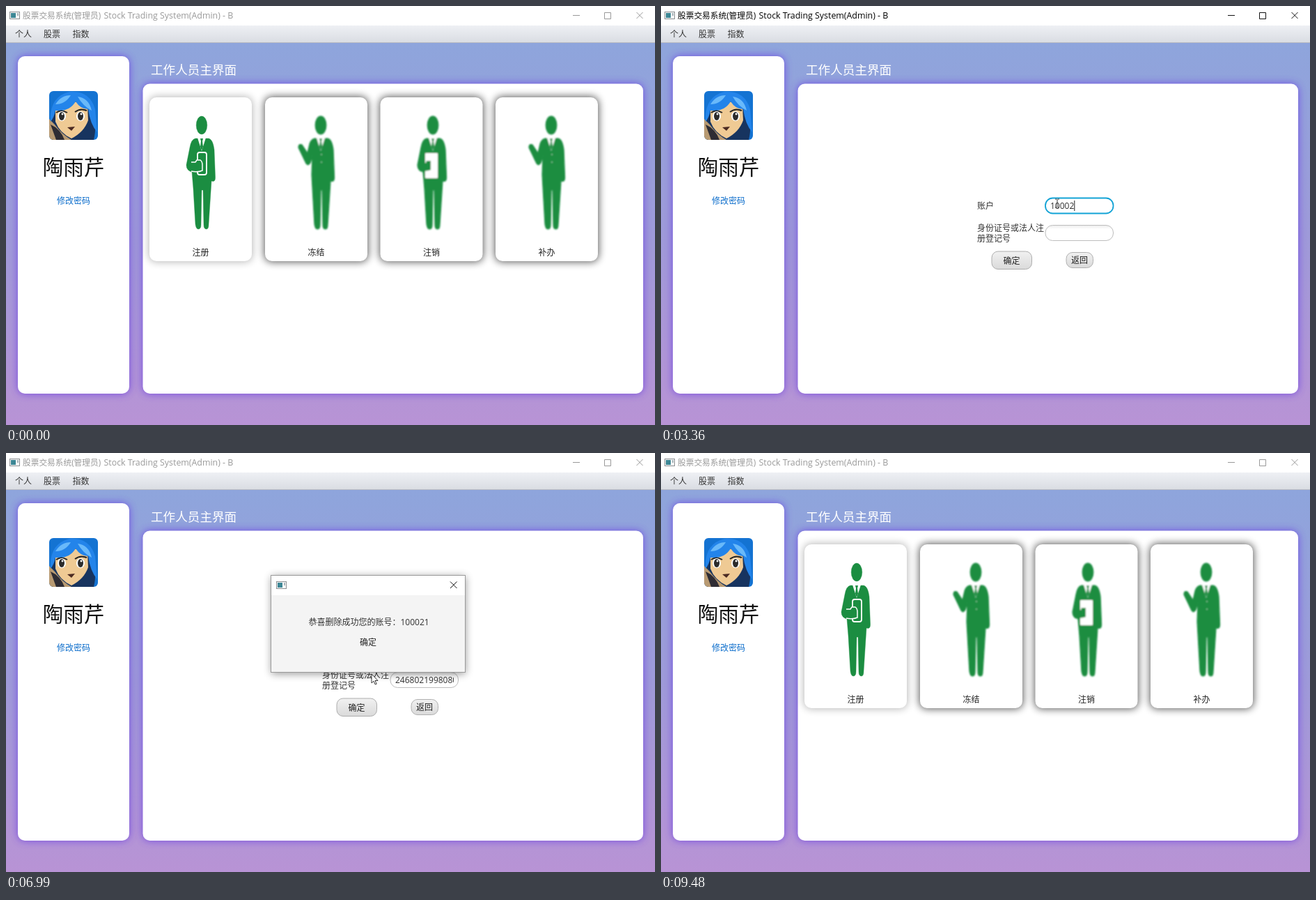
Write an HTML page that moves like this. It is 932 by 601 pixels and loops after 9570 ms.

```html
<!DOCTYPE html>
<html lang="zh-CN">
<head>
<meta charset="utf-8">
<title>股票交易系统</title>
<style>
html, body { margin: 0; width: 100%; height: 100%; overflow: hidden; background: #fff; }
svg { display: block; width: 932px; height: 601px; }
text { font: 12px "Open Sans", "Noto Sans CJK SC", "Noto Sans CJK JP", "Noto Sans CJK", sans-serif; white-space: pre; }
</style>
</head>
<body>
<svg id="stage" viewBox="0 0 932 601" xmlns="http://www.w3.org/2000/svg"></svg>
<script>
const LOOP = 9570;
const GREEN = '#1b8d41';

// Markup helpers
const rect = (x, y, w, h, r, attrs) => `<rect x="${x}" y="${y}" width="${w}" height="${h}" rx="${r}" ${attrs}/>`;
const label = (x, y, str, attrs = 'fill="#333"') => `<text x="${x}" y="${y}" ${attrs}>${str}</text>`;
const path = (d, attrs) => `<path d="${d}" ${attrs}/>`;
const gradient = (id, ...colors) => `<linearGradient id="${id}" x2="0" y2="1">${colors.map((c, i) =>
  `<stop offset="${i / (colors.length - 1)}" stop-color="${c}"/>`).join('')}</linearGradient>`;
const blur = (id, s) => `<filter id="${id}" x="-30%" y="-30%" width="160%" height="160%"><feGaussianBlur stdDeviation="${s}"/></filter>`;

const defs = `<defs>
  ${gradient('sky', '#8ea5dc', '#9e9ad9', '#b893d5')}
  ${gradient('bar', '#eef0f4', '#dadde3')}
  ${gradient('btn', '#f1f1f1', '#dadada')}
  ${gradient('inset', '#ececec', '#fff', '#fff', '#fff', '#fff')}
  ${blur('glow', 6)}${blur('shade', 6)}${blur('soft', .9)}
  <clipPath id="face"><rect x="62" y="122" width="70" height="70" rx="6"/></clipPath>
  <clipPath id="entry"><rect x="557" y="314" width="86" height="24"/></clipPath>
</defs>`;

const appIcon = (x, y) => `<g transform="translate(${x} ${y})">
  ${rect(.5, .5, 14, 10, 0, 'fill="#f7f7f7" stroke="#8b8f92"')}
  ${rect(2, 2, 7, 7, 0, 'fill="#3d8795"')}${rect(11, 2, 2, 4, 0, 'fill="#a9b5ba"')}</g>`;

const panel = (x, y, w, h) =>
  rect(x, y, w, h, 10, 'fill="#6a3ce2" opacity=".85" filter="url(#glow)"') + rect(x, y, w, h, 10, 'fill="#fff"');

const avatar = `<g clip-path="url(#face)">
  ${rect(62, 122, 70, 70, 0, 'fill="#1473d2"')}
  ${path('M66 192C60 160 68 130 95 124C122 126 134 158 126 192Z', 'fill="#17345f"')}
  ${path('M71 146Q90 130 117 143L118 164Q112 181 94 190Q77 182 71 166Z', 'fill="#efca94"')}
  ${path('M62 162L70 170Q80 184 94 192H62Z', 'fill="#b89a72"')}
  ${path('M64 170Q78 176 84 192H72Z', 'fill="#2e2c33"')}
  ${path('M64 166Q62 130 91 123Q120 121 128 148L131 181Q121 170 118 148Q107 148 100 137Q91 152 71 150Q69 160 64 166Z', 'fill="#2384ea"')}
  ${path('M71 141Q79 128 93 128Q85 141 71 141ZM103 130Q119 132 123 150Q110 143 103 130Z', 'fill="#69b9fa"')}
  ${path('M72 153Q79 148 88 153M99 152Q107 146 116 150', 'fill="none" stroke="#222" stroke-width="2"')}
  ${[80, 107].map(x => `<ellipse cx="${x}" cy="158" rx="6" ry="7" fill="#fff"/><ellipse cx="${x}" cy="158" rx="4" ry="6" fill="#2b2b2b"/><circle cx="${x + 1}" cy="155" r="1.4" fill="#fff"/>`).join('')}
  ${path('M88 174L99 173L94 179Z', 'fill="#4b2a22"')}
</g>`;

// Figures are drawn around the centre line of the head
const legs = 'L-9 313Q-8 320 -5 320Q-1 320 -1 314L0 264H2L3 314Q3 320 7 320Q10 320 10 313L14 251Q20 253 19.500 245L18 206Q16 191 10 190Z';
const folded = 'M-9 190Q-15 191 -17 203L-22 228Q-22 236 -14 238L-12 262' + legs;
const waving = 'M-9 190Q-14 191 -16 198L-19 211L-27 199Q-32 197 -32 203L-21 226Q-18 230 -15 225L-12 215L-13 242' + legs;
const collar = path('M-6 189L0 208L6 189Z', 'fill="#fff"') + path('M-2 190H2L1 194L2 202L0 207L-2 202L-1 194Z', `fill="${GREEN}"`);
const hand = 'M-20 228L-10 225L-9 222H-3V235Q-8 237 -19 237Z';
const board = rect(-6, 210, 13, 32, 3, `fill="${GREEN}" stroke="#fff" stroke-width="1.8"`) +
  path('M-15 224H-9L-7 221H-2Q1 223 1 228V236Q-6 239 -15 237', `fill="${GREEN}" stroke="#fff" stroke-width="1.5"`);
const sheet = rect(-11, 211, 18, 36, 1, 'fill="#fff"') + path(hand, `fill="${GREEN}"`);
const dots = '<circle cx="1" cy="213" r="1" fill="#8cc6a0"/><circle cx="1" cy="224" r="1" fill="#8cc6a0"/>';

const figure = (x, body, extra, soft) => `<g transform="translate(${x})" ${soft ? 'filter="url(#soft)"' : ''}>
  <g fill="${GREEN}" stroke="${GREEN}" stroke-width="${soft ? 1.2 : .4}"><ellipse cy="171" rx="7.8" ry="13"/>${path(body, '')}</g>
  ${collar}${extra}</g>`;

const cards = [
  { x: 206, name: '注册', art: figure(281, folded, board, false), shade: .28 },
  { x: 372, name: '冻结', art: figure(452, waving, dots, true), shade: .65 },
  { x: 537.5, name: '注销', art: figure(613, folded, sheet, true), shade: .65 },
  { x: 703, name: '补办', art: figure(783, waving, dots, true), shade: .65 }
];
const cardMarkup = (c, i) => rect(c.x, 131, 147, 235, 10, `id="shade${i}" filter="url(#shade)"`) +
  rect(c.x, 131, 147, 235, 10, 'fill="#fff"') + c.art +
  label(c.x + 73.5, 358, c.name, 'text-anchor="middle" fill="#222"');

const field = (id, y) => rect(552, y, 97.5, 22, 10.5, 'fill="url(#inset)" stroke="#bdbdbd"') +
  rect(552, y, 97.5, 22, 10.5, `id="${id}" fill="#fff" stroke="#12a3d6" stroke-width="1.8"`);

const form = `<g id="form">
  ${label(454, 290.5, '账户')}${label(454, 323, '身份证号或法人注')}${label(454, 337.5, '册登记号')}
  ${field('focus1', 275.5)}${field('focus2', 314.5)}
  ${label(559, 291, '', 'id="account" fill="#333"')}
  <g clip-path="url(#entry)">${label(559, 330, '246802199808080000', 'id="idNo" fill="#333"')}</g>
  ${rect(0, 0, 1, 15, 0, 'id="caret" fill="#222"')}
  ${rect(475, 352, 57.5, 25.5, 9, 'id="ok" fill="url(#btn)"')}${label(503.5, 369.5, '确定', 'text-anchor="middle" fill="#222"')}
  ${rect(582, 353.5, 38.5, 22, 9, 'fill="url(#btn)" stroke="#b0b0b0"')}${label(601, 369, '返回', 'text-anchor="middle" fill="#222"')}
</g>`;

const dialog = `<g id="dialog">
  ${rect(381, 177, 279, 140, 2, 'fill="#000" opacity=".4" filter="url(#shade)"')}
  ${rect(380.5, 175.5, 279, 139, 0, 'fill="#f4f4f4" stroke="#9a9a9a"')}
  ${rect(381, 176, 278, 28, 0, 'fill="#fff"')}${appIcon(388, 184)}
  ${path('M638 184.500L647.500 194M647.500 184.500L638 194', 'id="shut" fill="none"')}
  ${label(434.5, 247, '恭喜删除成功您的账号：100021')}
  <circle id="ripple" cx="525.5" cy="273" r="8.5" fill="#9a9a9a"/>
  ${label(520, 276, '确定', 'text-anchor="middle" fill="#222"')}
</g>`;

const chrome = rect(0, 0, 932, 28, 0, 'fill="#fff"') + appIcon(5, 8) +
  `<g id="caption">${label(24, 18, '股票交易系统(管理员)', 'style="font-size:11.7px"')}${label(140.5, 18, 'Stock Trading System(Admin) - B', 'style="font-size:12.4px"')}</g>` +
  path('M814 13.500H824M859.500 9.500H868.500V18.500H859.500ZM905.500 9L914.500 18M914.500 9L905.500 18', 'id="controls" fill="none"') +
  rect(0, 28, 932, 24, 0, 'fill="url(#bar)"') + rect(0, 52, 932, 1, 0, 'fill="#b9bbc2"') +
  label(13, 45, '个人') + label(54, 45, '股票') + label(95.5, 45, '指数');

const stage = document.getElementById('stage');
stage.innerHTML = defs + rect(0, 52, 932, 549, 0, 'fill="url(#sky)"') + chrome +
  panel(17, 72, 160, 484) + panel(196.5, 111.5, 718.5, 444.5) + avatar +
  label(97, 242, '陶雨芹', 'text-anchor="middle" fill="#111" style="font-size:29.5px"') +
  label(97, 284, '修改密码', 'text-anchor="middle" fill="#0a6ccb"') +
  label(208, 98, '工作人员主界面', 'fill="#fff" style="font-size:17.6px"') +
  `<g id="cards">${cards.map(cardMarkup).join('')}</g>` + form + dialog +
  path('M0 0V13L3 10.200L5.200 15L7.200 14.200L5 9.500H9Z', 'id="arrow" fill="#fff" stroke="#222" stroke-width=".9"') +
  path('M-3 -6H-.5M.5 -6H3M0 -5.500V5.500M-3 6H-.5M.5 6H3', 'id="beam" fill="none" stroke="#333"');

const $ = id => document.getElementById(id);
const show = (id, on) => $(id).setAttribute('visibility', on ? 'inherit' : 'hidden');
const set = (id, attrs) => { for (const k in attrs) $(id).setAttribute(k, attrs[k]); };

// Pointer route: time, x, y
const route = [
  [230, 660, 541], [770, 588, 304], [910, 588, 304], [1010, 589, 328], [1380, 589, 328],
  [1610, 569, 283], [4190, 569, 283], [4650, 573, 324], [5200, 573, 324], [5510, 512, 361],
  [6060, 512, 361], [6061, 515, 367], [6500, 515, 367], [7290, 529, 294], [7370, 529, 294],
  [7770, 529, 276], [8070, 529, 276], [8071, 528, 275], [8530, 528, 275], [8930, 918, 592]
];
const keys = [2400, 2630, 2800, 3030, 3360, 3580];

function pointer(t) {
  const i = route.findIndex(p => p[0] > t);
  if (i < 1) return null;
  const [a, b] = [route[i - 1], route[i]];
  const u = (t - a[0]) / (b[0] - a[0]), e = u * u * (3 - 2 * u);
  return { x: a[1] + (b[1] - a[1]) * e, y: a[2] + (b[2] - a[2]) * e };
}

// A stroke on the blurred rectangle spreads the shadow outwards
const hoverShade = { fill: '#5a22e0', stroke: '#5a22e0', 'stroke-width': 7, opacity: .9 };
const restShade = opacity => ({ fill: '#000', stroke: '#000', 'stroke-width': 2, opacity });

function draw(t) {
  const within = (a, b) => t >= a && t < b;
  const active = within(700, 6360) || within(8300, 9480);
  const onForm = within(1010, 8390);
  const p = pointer(t);

  set('caption', { fill: active ? '#000' : '#999' });
  set('controls', { stroke: active ? '#111' : '#999' });

  show('cards', !onForm);
  const lit = p ? cards.findIndex(c => p.x > c.x - 10 && p.x < c.x + 157 && p.y > 121 && p.y < 376) : -1;
  cards.forEach((c, i) => set('shade' + i, i === lit ? hoverShade : restShade(c.shade)));

  show('form', onForm);
  const in1 = within(1780, 4500), in2 = within(4500, 5440), armed = within(5440, 6460);
  const typed = keys.filter(k => t >= k).length;
  $('account').textContent = '100021'.slice(0, typed);
  show('focus1', onForm && in1);
  show('focus2', onForm && in2);
  show('idNo', onForm && t >= 4880);
  show('caret', within(1930, 4040) || in2);
  set('caret', in2 ? { x: t < 4880 ? 559 : 642, y: 318 } : { x: 559 + typed * 6.86, y: 279 });
  set('ok', { stroke: armed ? '#12a3d6' : '#adadad', 'stroke-width': armed ? 1.8 : 1, fill: armed ? '#d2d2d2' : 'url(#btn)' });

  show('dialog', within(6460, 8390));
  const grow = Math.max(0, Math.min(1, (t - 6460) / 160)), s = .9 + .1 * grow;
  set('dialog', { opacity: grow, transform: `translate(520 245) scale(${s}) translate(-520 -245)` });
  set('shut', { stroke: active ? '#999' : '#111' });
  show('ripple', within(8300, 8390));

  const overField = p && within(1380, 5400) && p.x > 552 && p.x < 650 &&
    ((p.y > 275 && p.y < 298) || (p.y > 314 && p.y < 337));
  show('arrow', p && !overField);
  show('beam', overField);
  if (p) {
    const at = { transform: `translate(${Math.round(p.x)} ${Math.round(p.y)})` };
    set('arrow', at);
    set('beam', at);
  }
}

const start = performance.now();
function tick(now) {
  draw(Math.max(0, now - start) % LOOP);
  requestAnimationFrame(tick);
}
draw(0);
requestAnimationFrame(tick);
</script>
</body>
</html>
```
